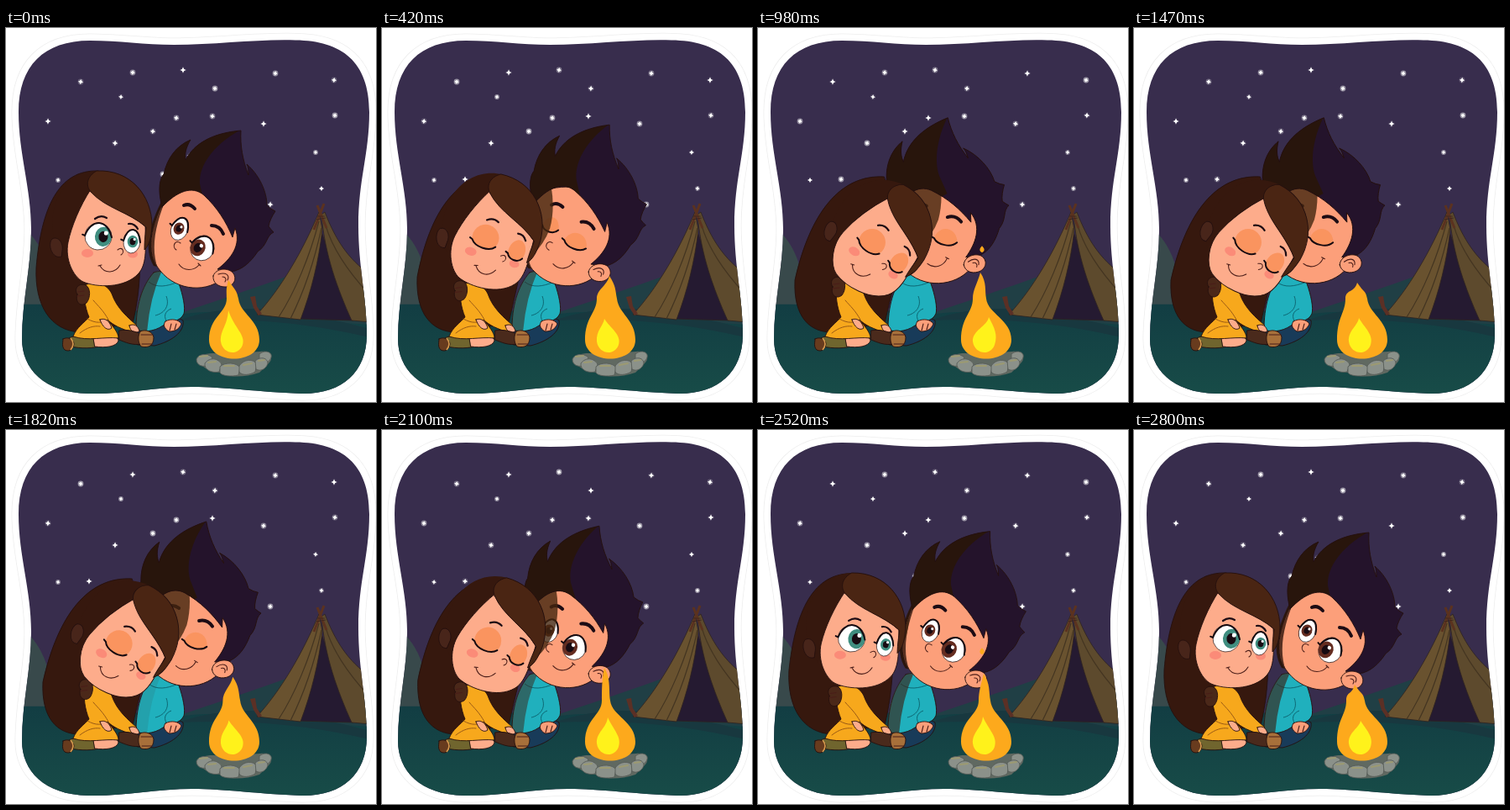
An HTML page for the animation above (2.87 s loop, 441 px wide and 445 px high).

```html
<!DOCTYPE html>
<html lang="en">
<head>
<meta charset="utf-8">
<title>Campfire night</title>
<style>
html, body { margin: 0; width: 100%; height: 100%; overflow: hidden; background: #fff; }
svg { display: block; width: 441px; height: 445px; }
.ink { stroke: #25100e; stroke-width: .9; stroke-linejoin: round; stroke-linecap: round; }
.line { fill: none; stroke: #4a1d18; stroke-width: 1.1; stroke-linecap: round; }
.seam { fill: none; stroke: #9b5b15; stroke-width: 1; stroke-linecap: round; }
.brow { fill: none; stroke: #1d0c14; stroke-width: 4; stroke-linecap: round; }
.lash { fill: none; stroke: #160a10; stroke-width: 2; stroke-linecap: round; }
.skin { fill: #fdac8b; }
.tan { fill: #fc9f7a; }
</style>
</head>
<body>
<svg viewBox="0 0 441 445">
<defs>
  <path id="cardShape" d="M100 15C135 15 165 20 200 20C250 20 300 13 345 14.5C400 15 433 40 433 100C433 150 420 180 420 235C420 285 430 320 430 365C430 410 400 436 352 435C300 433 260 427 222 427C180 427 140 436 98 435C45 434 19 405 19 370C19 325 30 285 30 240C30 190 15 150 15 100C15 45 45 15 100 15Z"/>
  <clipPath id="card"><use href="#cardShape"/></clipPath>
  <linearGradient id="grass" x2="0" y2="1"><stop stop-color="#123d43"/><stop offset="1" stop-color="#184d48"/></linearGradient>
  <path id="boyFace" d="M193 198C172 235 166 268 184 289C204 314 242 315 260 296C282 276 291 250 278 218C258 190 218 185 193 198Z"/>
  <clipPath id="boyClip"><use href="#boyFace"/></clipPath>
  <path id="sweater" d="M176 291C188 286 203 294 206 304C211 318 214 333 212 340C207 350 198 348 191 351C181 360 167 363 155 359C155 332 161 308 176 291Z"/>
  <clipPath id="sweaterClip"><use href="#sweater"/></clipPath>
  <path id="hair" d="M186 213C180 190 184 178 188 174C192 155 203 140 220 133C214 143 213 150 214 157C224 138 245 125 280 122C279 140 282 157 289 175C289 169 289 166 287 162C302 175 311 195 311 211Q316 216 321 218C317 224 314 230 313 236Q316 240 319 243C310 247 312 258 300 266C292 278 282 288 268 290L252 287C268 275 281 258 273 238L270 249C262 230 252 214 236 199C222 187 204 194 186 213Z"/>
  <clipPath id="hairClip"><use href="#hair"/></clipPath>
</defs>

<use href="#cardShape" fill="#fff" stroke="#ededed" stroke-width="17"/>
<use href="#cardShape" fill="#fff" stroke="#fff" stroke-width="15.5"/>

<g clip-path="url(#card)">
  <rect width="441" height="445" fill="#382d4d"/>
  <g id="stars" fill="#fff"></g>

  <!-- hills -->
  <path d="M15 234C40 250 52 275 60 335H15Z" fill="#38494b"/>
  <path d="M190 345C250 325 300 308 345 292Q400 292 441 315V370H190Z" fill="#203f45"/>
  <path d="M10 329C90 327 140 336 205 341C270 330 350 350 441 353V445H10Z" fill="url(#grass)"/>
  <path d="M205 348C270 326 330 330 441 360V370C350 348 280 345 205 348Z" fill="#18383f"/>

  <!-- tent -->
  <g stroke="#2e2220" stroke-width=".8">
    <path d="M375 240L414 348L349 346Z" fill="#251a31"/>
    <path d="M373 219C354 265 327 311 299 341L351 347C364 313 373 276 377 240Z" fill="#69522f"/>
    <path d="M376 222C380 270 395 310 412 348L435 350V294C407 275 392 250 380 219Z" fill="#5d4a2d"/>
    <path d="M373 230C362 272 344 315 325 344M376 238C367 280 354 316 339 346M381 235C389 262 408 290 432 316" fill="none" stroke="#443521" stroke-width="1.2"/>
    <path d="M371 211L382 238M379 209L367 240" fill="none" stroke="#5b321f" stroke-width="3"/>
    <path d="M371 224H380M370 228L381 226" fill="none" stroke="#38241c"/>
  </g>
  <path d="M291 320L297 319L299 331L305 340L301 342L295 333Z" fill="#5b3025"/>

  <!-- boy -->
  <path class="ink" d="M152 356C170 344 199 340 211 348C213 362 197 373 177 378L157 377Z" fill="#183b59"/>
  <use href="#sweater" class="ink" fill="#20b0bd"/>
  <path d="M170 302C180 310 192 307 203 303M191 319C196 332 187 340 178 342M193 351C187 344 189 337 197 334" fill="none" stroke="#0d6773"/>
  <path id="sleeveShade" clip-path="url(#sweaterClip)" d="M150 280H190Q172 315 168 362H150Z" fill="#3a2418"/>
  <path class="ink tan" d="M190 349C197 345 206 347 209 352C206 359 201 361 194 361C188 357 187 353 190 349Z"/>
  <path class="line" d="M197 352L195 360M203 352L201 359"/>

  <g id="boy">
    <path d="M186 205C172 232 163 262 176 283L205 290L220 210Z" fill="#2b160d"/>
    <use href="#boyFace" class="ink tan"/>
    <path clip-path="url(#boyClip)" d="M193 198C178 232 172 262 181 286L155 290V190Z" fill="#573021"/>
    <g id="boyEyes"></g>
    <path class="brow" d="M212 211Q219 208 225 215"/>
    <path class="brow" d="M245 235Q255 235 259 245"/>
    <path class="line" d="M203 264C197 260 202 251 208 256M206 281C212 290 224 289 230 282M229 280L232 283"/>
    <g clip-path="url(#boyClip)"><path id="faceShade" fill="#44260f" opacity=".8"/></g>
    <g id="boyHair">
      <use href="#hair" fill="#24132b"/>
      <g clip-path="url(#hairClip)"><path id="warmHair" fill="#28150c"/></g>
      <use href="#hair" class="ink" fill="none"/>
    </g>
    <path class="ink tan" d="M247 295C250 285 266 285 271 292C276 300 270 308 261 308C253 308 246 303 247 295Z"/>
    <path class="line" d="M253 293C262 290 267 294 264 300M258 296C262 296 263 299 261 302"/>
  </g>

  <!-- girl -->
  <path id="mane" class="ink" fill="#36180e"/>
  <path class="ink" d="M75 369C80 365 101 365 111 370V379C99 382 82 381 75 378Z" fill="#70652e"/>
  <path class="ink" d="M68 370C74 367 79 370 81 375C81 382 76 386 70 383C66 379 68 374 68 370Z" fill="#683b1e"/>
  <path d="M77 369Q83 376 77 383" fill="none" stroke="#d69a4e" stroke-width="1.6"/>
  <path class="ink skin" d="M104 367C119 362 134 366 134 372C132 379 119 381 106 379Z"/>
  <path class="ink" d="M94 306C106 300 120 304 126 316C132 334 146 345 156 354L150 362C138 358 128 354 121 347C127 355 134 362 134 369C117 367 98 373 80 367C84 356 94 350 99 344C94 332 92 318 94 306Z" fill="#f7a81c"/>
  <path class="seam" d="M104 324C110 331 116 336 122 347M97 346C107 352 115 351 121 347M88 363C97 356 105 354 112 355"/>
  <g id="hug">
    <path class="ink" d="M85 317C80 309 88 303 95 306C101 309 101 321 96 327C88 333 82 325 85 317Z" fill="#4b2819"/>
    <path class="line" d="M86 314L93 313M85 319L93 318"/>
  </g>
  <path class="ink skin" d="M112 347C119 344 124 350 126 357C121 361 115 356 112 347Z"/>
  <path class="ink skin" d="M147 354C153 351 158 355 159 361C153 364 148 361 147 354Z"/>
  <path class="ink" d="M135 360C145 358 155 361 162 365V376C151 378 142 374 135 371Z" fill="#4a2a1c"/>
  <path class="ink" d="M160 361C166 358 175 361 176 368C176 378 170 381 161 379C157 374 157 366 160 361Z" fill="#a8703a"/>
  <path class="line" d="M161 365H175M162 376H174"/>

  <g id="girl">
    <path d="M63 268C42 218 67 171 110 170C150 169 175 200 173 238L154 278L87 297Z" fill="#36180e"/>
    <path class="ink" d="M66 272C55 276 49 257 55 251C62 247 69 256 67 265Z" fill="#48251a"/>
    <path class="ink skin" d="M101 192C88 212 78 236 74 255C70 275 80 296 92 302C108 309 142 310 158 292C167 282 167 265 166 236C145 218 118 214 101 192Z"/>
    <ellipse cx="97" cy="268" rx="7" ry="5" fill="#fb8b78"/>
    <ellipse cx="151" cy="269" rx="6" ry="4.5" fill="#fb8b78"/>
    <g id="girlEyes"></g>
    <path class="brow" d="M106 227Q113 222 120 226M146 233Q153 232 157 239" style="stroke-width:2.2"/>
    <path class="line" d="M133 264C139 259 142 267 137 270"/>
    <path id="smile" class="line" d="M112 281C118 291 130 290 136 280M110 281L114 280"/>
    <path class="ink" d="M101 195C94 187 97 176 108 170C148 168 174 199 174 235C173 250 171 258 165 264C165 252 166 245 167 237C147 219 119 215 101 195Z" fill="#4a2513"/>
  </g>

  <!-- fire -->
  <path transform="translate(-1 2)" d="M228 395C228 386 244 383 258 386L304 383C316 381 321 391 314 397L303 408C285 414 266 414 256 408L239 403Z" fill="#606961"/>
  <path id="flame" fill="#fda91c"/>
  <path id="core" fill="#fff21b"/>
  <path id="spark" fill="#fda91c"/>
  <g transform="translate(-1 2)">
    <g stroke="#565c57" stroke-width=".9" fill="#8b918a">
      <path d="M228 392C231 385 242 385 247 390L243 399C236 402 228 400 228 392Z"/>
      <path d="M303 386C310 380 319 384 317 390C315 396 308 399 303 396Z"/>
      <path d="M238 397C244 389 254 391 258 398L255 407C247 409 237 405 238 397Z"/>
      <path d="M256 401C262 395 276 396 280 402L278 411C270 413 258 412 256 408Z"/>
      <path d="M279 400C284 392 296 391 300 398L298 407C292 411 282 412 279 407Z"/>
      <path d="M298 394C305 388 313 391 313 397C311 404 304 407 299 404Z"/>
    </g>
    <path d="M232 389L241 388M242 396L251 395M261 400L273 400M284 399L294 397M302 394L309 393" stroke="#9c9a72" stroke-width="2" stroke-linecap="round"/>
  </g>
</g>
</svg>
<script>
const LOOP = 2870, STEP = 70, NS = 'http://www.w3.org/2000/svg';
const $ = id => document.getElementById(id);
const set = (id, name, value) => $(id).setAttribute(name, value);
const mix = (a, b, p) => a + (b - a) * p;
const part = (t, a, b) => Math.min(1, Math.max(0, (t - a) / (b - a)));
const ramp = (t, a, b) => {
  const p = part(t, a, b);
  return p * p * (3 - 2 * p);
};
const pulse = (t, a, b, c, d) => ramp(t, a, b) - ramp(t, c, d);
const easeOut = p => 1 - (1 - p) ** 2;

function add(parent, tag, attrs) {
  const el = document.createElementNS(NS, tag);
  for (const k in attrs) el.setAttribute(k, attrs[k]);
  return parent.appendChild(el);
}

// Stars: a soft dot that sharpens into a four-point sparkle
const stars = [
  [89, 64], [151, 53], [211, 50], [321, 54], [391, 62], [137, 82], [249, 72], [50, 111],
  [203, 107], [246, 105], [307, 114], [392, 104], [130, 137], [175, 123], [369, 148],
  [376, 191], [62, 181], [99, 180], [315, 210], [187, 174], [219, 152]
].map(([x, y], i) => {
  const g = add($('stars'), 'g', { transform: `translate(${x} ${y})` });
  const size = [5, 14, 15, 16].includes(i) ? .85 : 1;
  const glow = add(g, 'circle', { r: 3.4 * size });
  add(g, 'circle', { r: 1.7 * size });
  const ray = add(g, 'path', { d: 'M0-3.8L1.1-1.1L3.8 0L1.1 1.1L0 3.8L-1.1 1.1L-3.8 0L-1.1-1.1Z' });
  return { glow, ray, size, phase: i * 2.4 };
});

function twinkle(t) {
  for (const s of stars) {
    const p = .5 + .5 * Math.sin(t / LOOP * Math.PI * 4 + s.phase);
    s.glow.setAttribute('opacity', .5 * p);
    s.ray.setAttribute('transform', `rotate(${14 * p}) scale(${s.size * mix(1, .7, p)})`);
  }
}

// Returns a setter for how far the eye is shut; rest is the height of the closed lash
function makeEye(parent, [x, y, rx, ry, tilt], iris, [ix, iy], rest) {
  const g = add(parent, 'g', { transform: `translate(${x} ${y}) rotate(${tilt})` });
  const open = add(g, 'g', {});
  add(open, 'ellipse', { rx, ry, fill: '#fff', stroke: '#2b1715', 'stroke-width': .7 });
  const r = rx * .63;
  add(open, 'ellipse', { cx: ix, cy: iy, rx: r, ry: r * 1.15, fill: iris });
  add(open, 'ellipse', { cx: ix, cy: iy, rx: r * .55, ry: r * .65, fill: '#180b12' });
  add(open, 'circle', { cx: ix + r * .3, cy: iy - r * .45, r: r * .25, fill: '#fff' });
  const lid = add(g, 'path', { fill: '#fa945f' });
  const lash = add(g, 'path', { class: 'lash' });
  return shut => {
    const end = rest * shut;
    const w = rx * Math.sqrt(1 - end * end);
    const ey = ry * end;
    const k = ey + mix(-ry * 1.33, ry * .5, shut);
    const curve = `C${w * .6} ${k} ${-w * .6} ${k} ${-w} ${ey}`;
    open.style.display = shut > .9 ? 'none' : '';
    lid.setAttribute('d', shut < .05 ? '' : `M${-w} ${ey}A${rx} ${ry} 0 ${end > 0 ? 1 : 0} 1 ${w} ${ey}${curve}Z`);
    lash.setAttribute('d', `M${w} ${ey}${curve}l-3 -1`);
  };
}
const boyEyes = [
  makeEye($('boyEyes'), [207, 239, 10, 14, 24], '#642c20', [-1, 0], -.1),
  makeEye($('boyEyes'), [234, 262, 14, 15, 28], '#642c20', [-5, 2], -.1)
];
const girlEyes = [
  makeEye($('girlEyes'), [110, 248, 16, 16, 4], '#408e80', [6, 0], .4),
  makeEye($('girlEyes'), [150, 254, 10, 14, 6], '#408e80', [1, 0], .4)
];

// Flame keys: time, tip x, tip y, neck x, neck half width, core tip x, core tip y
const flames = [
  [0, 265, 300, 270, 7, 265, 336],
  [210, 263, 303, 264, 11, 270, 346],
  [420, 271, 295, 268, 12, 265, 346],
  [700, 266, 286, 265, 6, 268, 344],
  [980, 265, 291, 264, 8, 275, 344],
  [1225, 269, 290, 270, 7, 268, 341],
  [1470, 266, 303, 265, 13, 268, 345],
  [1785, 271, 295, 269, 11, 265, 346],
  [2100, 265, 283, 267, 5, 269, 342],
  [2310, 265, 292, 265, 9, 273, 344],
  [2520, 269, 290, 270, 7, 268, 341],
  [2800, 263, 303, 264, 11, 270, 346],
  [2870, 265, 300, 270, 7, 265, 336]
];

function burn(t) {
  const i = flames.findIndex(f => f[0] > t);
  const a = flames[i - 1], b = flames[i];
  const p = part(t, a[0], b[0]);
  const [, x, y, n, w, cx, cy] = a.map((v, j) => mix(v, b[j], p));
  set('flame', 'd', `M${x} ${y}C${x - 3} ${y + 12} ${n - w} 311 ${n - w} 322
    C${n - w} 339 242 344 242 371C242 401 302 401 302 371C302 347 ${n + w + 2} 340 ${n + w} 322
    C${n + w - 2} 312 ${x + 8} ${y + 12} ${x} ${y}Z`);
  set('core', 'd', `M${cx} ${cy}C${cx - 1} 354 255 360 256 373
    C258 388 277 391 282 377C286 365 ${cx + 7} 357 ${cx} ${cy}Z`);

  // A spark breaks off and shrinks as it rises
  const age = ((t + 420) % 1540 - 1260) / 210;
  const sy = mix(272, 260, age), r = mix(4, 2, age);
  set('spark', 'd', age >= 0 && age <= 1
    ? `M267 ${sy - 1.8 * r}q${r * 2} ${r * 2} 0 ${r * 3}q${-r * 2} ${-r} 0 ${-r * 3}Z` : '');
}

function poseGirl(g) {
  set('girl', 'transform', `rotate(${30 * g} 110 300)`);
  set('smile', 'transform', `translate(${-9 * g} 2)`);
  set('hug', 'transform', `translate(${4 * g} ${-9 * g})`);
  set('sleeveShade', 'opacity', .65 * (1 - g ** 3));

  // Long hair trails from the head but stays put at the ground
  const q = easeOut(g);
  const m = (x, y, x2, y2) => `${mix(x, x2, q)} ${mix(y, y2, q)} `;
  set('mane', 'd', 'M' + m(110, 170, 150, 177) +
    'C' + m(62, 168, 98, 174) + m(42, 215, 62, 220) + m(36, 285, 44, 300) +
    'C' + m(34, 330, 42, 343) + m(53, 360, 61, 362) + '88 362L151 351C156 330 162 300 ' + m(159, 245, 178, 262) + 'Z');
}

function poseBoy(b, g, lag) {
  set('boy', 'transform', `translate(${mix(260, 258, b)} ${mix(296, 279, b)}) rotate(${-17 * b}) translate(-260 -296)`);
  set('boyHair', 'transform', `rotate(${lag} 260 270)`);
  set('warmHair', 'd', `M280 121C${mix(245, 262, b)} 140 ${mix(230, 249, b)} 165 ${mix(231, 250, b)} 185
    L${mix(236, 253, b)} 208L170 225V100Z`);

  // Shadow of her hair stays upright inside the tilted head
  const sx = mix(176, 219, Math.min(1, g * 1.25));
  set('faceShade', 'd', `M150 180H${sx - 4}Q${sx + 6} 215 ${sx - 2} 245Q${sx - 9} 264 ${sx - 24} 278L150 300Z`);
  set('faceShade', 'transform', `rotate(${17 * b} 260 296)`);
}

function draw(now) {
  const t = Math.floor(now % LOOP / STEP) * STEP;
  const g = pulse(t, 0, 840, 1680, 2660);
  const b = ramp(t, 70, 910) - easeOut(part(t, 1680, 2800));
  twinkle(t);
  burn(t);
  poseGirl(g);
  poseBoy(b, g, 4.5 * Math.sin(Math.PI * ramp(t, 70, 840)));

  const girlShut = pulse(t, 140, 350, 2170, 2380);
  const boyShut = pulse(t, 140, 350, 1890, 2100);
  girlEyes.forEach(eye => eye(girlShut));
  boyEyes.forEach(eye => eye(boyShut));
}

function tick() {
  draw(performance.now());
  requestAnimationFrame(tick);
}
tick();
</script>
</body>
</html>
```
